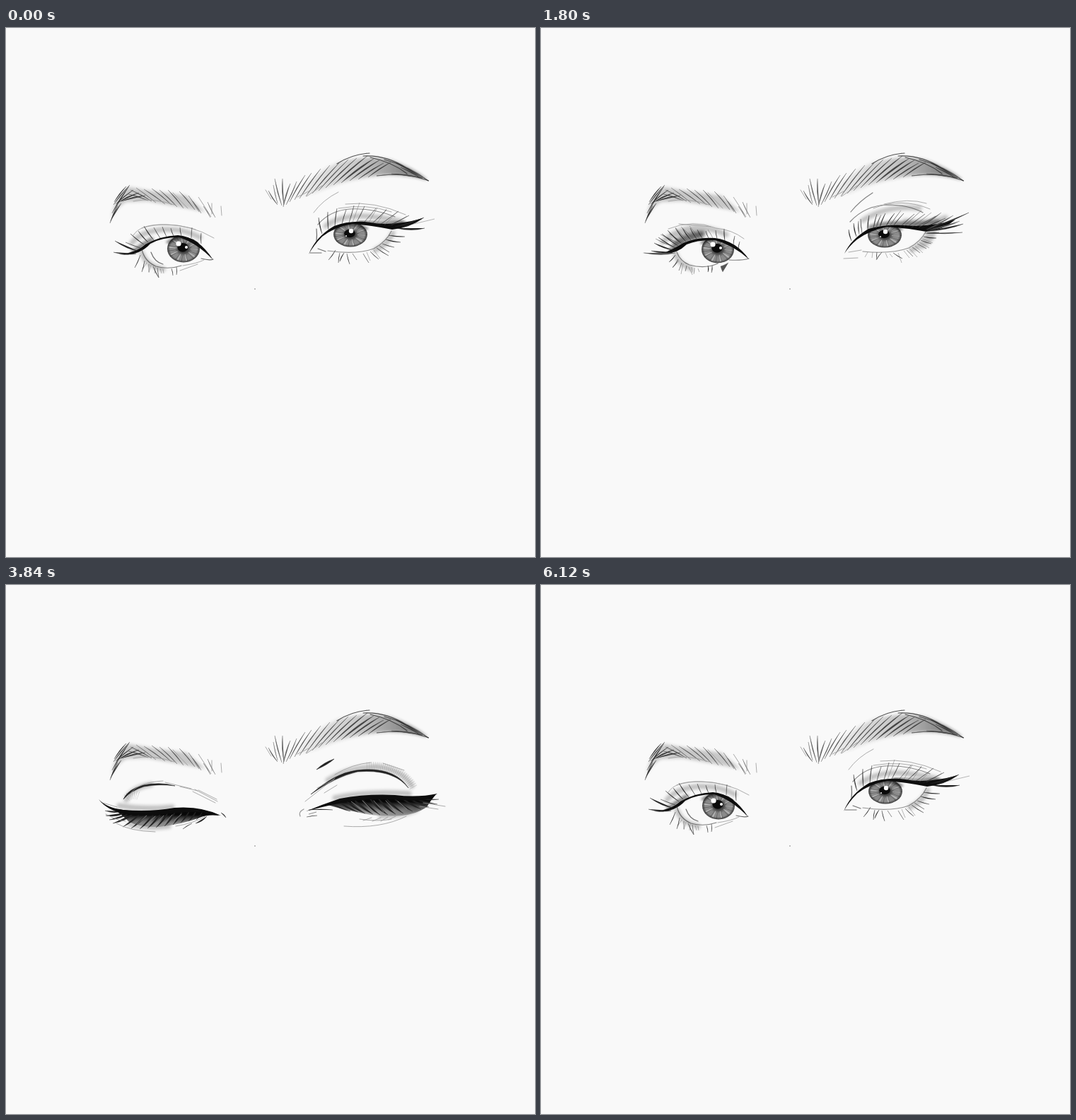
Write an HTML page without scripts that moves like this. It is 748 by 748 pixels and loops after 6.24 s.

```html
<!DOCTYPE html>
<html lang="en">
<head>
<meta charset="utf-8">
<title>Blinking eyes</title>
<style>
html,body{margin:0;width:100%;height:100%;overflow:hidden;background:#f9f9f9}
svg{display:block;width:100%;height:100%}
.h{fill:#222;stroke:#222;stroke-width:.5;stroke-linejoin:round;filter:url(#fine)}
.t{fill:#555;stroke:#555;stroke-width:.4}
.k{fill:#0d0d0d;filter:url(#fine)}
.l,.g,.s,.d,.x{fill:none;stroke:#333;stroke-width:1.2;stroke-linecap:round}
.g{stroke:#999;stroke-width:.8}
.s,.d{stroke:#555;stroke-width:7;opacity:.35;filter:url(#soft)}
.d{stroke:#111;stroke-width:5;opacity:.6}
.x{stroke:#777;stroke-width:12;stroke-linecap:butt;stroke-dasharray:.5 2.3;opacity:.4}
.m{filter:url(#soft)}
.p{opacity:0;animation:1.56s step-end infinite}
#pa{animation-name:a}#pb{animation-name:b}#pc{animation-name:c}
#pd{animation-name:d}#pe{animation-name:e}#pf{animation-name:f}
@keyframes a{0%{opacity:1}15.38%{opacity:0}92.3%,to{opacity:1}}
@keyframes b{0%{opacity:0}15.38%{opacity:1}23.07%{opacity:0}84.61%{opacity:1}92.3%,to{opacity:0}}
@keyframes c{0%{opacity:0}23.07%{opacity:1}30.76%{opacity:0}76.92%{opacity:1}84.61%,to{opacity:0}}
@keyframes d{0%{opacity:0}30.76%{opacity:1}38.46%{opacity:0}69.23%{opacity:1}76.92%,to{opacity:0}}
@keyframes e{0%{opacity:0}38.46%{opacity:1}46.15%{opacity:0}61.53%{opacity:1}69.23%,to{opacity:0}}
@keyframes f{0%{opacity:0}46.15%{opacity:1}61.53%,to{opacity:0}}
</style>
</head>
<body>
<svg viewBox="0 0 748 748">
<defs>
<filter id="soft" x="-30%" y="-60%" width="160%" height="220%"><feGaussianBlur stdDeviation="2"/></filter>
<filter id="fine"><feGaussianBlur stdDeviation=".4"/></filter>
<radialGradient id="ir">
<stop offset=".3" stop-color="#444"/><stop offset=".55" stop-color="#888"/>
<stop offset=".82" stop-color="#8c8c8c"/><stop offset="1" stop-color="#3a3a3a"/>
</radialGradient>
<linearGradient id="bg">
<stop offset="0" stop-color="#555" stop-opacity=".05"/><stop offset=".5" stop-color="#444" stop-opacity=".28"/>
<stop offset="1" stop-color="#222" stop-opacity=".7"/>
</linearGradient>
<linearGradient id="lash" x2="0" y2="1">
<stop offset=".35" stop-color="#080808"/><stop offset="1" stop-color="#333" stop-opacity=".3"/>
</linearGradient>
<g id="iris">
<circle r="23" fill="url(#ir)"/>
<circle r="15" fill="none" stroke="#e4e4e4" stroke-width="11" stroke-dasharray="1.6 8" opacity=".5"/>
<circle r="17" fill="none" stroke="#222" stroke-width="11" stroke-dasharray=".8 6.3" opacity=".4"/>
<path class="d" d="M-21-11Q0-27 21-11"/>
<circle cx="-1" cy="-2" r="7.5" fill="#0b0b0b"/>
</g>
<g id="irisL"><g transform="scale(1 .85)"><use href="#iris"/></g><circle cx="-7" cy="-7" r="3.6" fill="#fff"/><circle cx="4" cy="-2" r="2" fill="#fff"/></g>
<g id="irisR"><g transform="scale(1.04 .76)"><use href="#iris"/></g><circle cx="1" cy="-5" r="3.2" fill="#fff"/><circle cx="-6" cy="2" r="1.1" fill="#ddd"/></g>

<clipPath id="al"><path d="M192 314Q200 301 222 297Q245 291 265 299Q282 308 293 327Q268 330 250 336Q225 342 206 334Q195 326 192 314z"/></clipPath>
<clipPath id="ar"><path d="M430 318Q440 295 465 281Q490 272 515 277Q535 282 544 286Q538 302 520 313Q492 320 430 318z"/></clipPath>
<clipPath id="bl"><path d="M192 318Q200 304 222 300Q245 296 265 303Q282 311 293 327Q270 328 250 333Q225 341 206 334Q195 328 192 318z"/></clipPath>
<clipPath id="br"><path d="M430 318Q441 299 463 286Q490 278 515 281Q535 283 542 288Q536 302 520 311Q492 318 430 318z"/></clipPath>
<clipPath id="cl"><path d="M190 321Q205 308 225 305Q248 302 268 309Q284 316 295 327Q268 330 250 334Q225 340 206 335Q194 330 190 321z"/></clipPath>
<clipPath id="cr"><path d="M430 318Q445 304 467 292Q490 285 515 287Q535 288 545 292Q537 304 520 311Q490 319 430 318z"/></clipPath>
<clipPath id="dl"><path d="M186 323Q208 313 230 311Q255 309 275 316Q288 321 297 327Q265 332 240 337Q205 340 186 323z"/></clipPath>
<clipPath id="dr"><path d="M428 318Q447 309 468 299Q490 292 520 293Q540 294 550 297Q538 308 520 313Q490 319 428 318z"/></clipPath>
<clipPath id="el"><path d="M178 324Q210 320 235 316Q268 315 300 326Q265 331 240 335Q200 337 178 324z"/></clipPath>
<clipPath id="er"><path d="M426 319Q450 312 470 303Q495 296 525 297Q545 298 558 300Q540 312 520 315Q490 319 426 319z"/></clipPath>

<!-- raised lashes -->
<g id="upL">
<path class="d" d="M184 313Q200 300 228 294M188 305Q203 292 228 290"/>
<path class="h" d="M186 317q-16 3-30-2M187 314q-15-2-27-10M190 311q-12-5-24-15M194 308q-13-7-23-17M199 305q-12-8-20-19M205 302q-9-8-15-19M212 300q-8-8-12-17M220 298q-6-7-9-15M228 297q-5-6-7-12M237 297q-3-5-4-10M249 298q-2-6-2-12M260 301q-2-8-1-17M272 307q0-7 2-13M279 313q0-6 2-11"/>
<path class="t" d="M190 318q-20 5-44 0M188 310q-16-6-26-12M196 306q-14-9-27-14M201 304q-12-9-20-13M208 302q-9-9-18-20M216 299q-8-9-18-18M224 298q-6-8-14-18M243 297q-3-6-7-12"/>
</g>
<g id="upR">
<path class="d" d="M500 276Q525 280 562 274M465 282Q488 274 520 277"/>
<path class="h" d="M439 301q-4-8-4-16M446 295q-4-8-4-19M454 290q-2-9-2-20M462 286q-1-10 2-21M470 284q1-10 5-21M479 282q2-10 8-20M488 280q4-9 12-18M498 280q6-9 15-18M508 281q9-9 20-18M518 281q12-8 25-18M529 282q15-8 29-16M538 283q18-6 34-14M546 285q26-7 59-24M548 287q26-1 49-10M546 290q26 2 50-1"/>
<path class="t" d="M450 292q-3-9-1-19M474 283q1-9 7-19M493 280q6-10 16-22M513 281q10-10 25-23M524 282q14-10 28-21M534 282q16-7 32-21M545 285q20-7 38-20M550 285q25-3 42-12"/>
</g>
<!-- lower lashes -->
<g id="loL">
<path class="s" d="M190 319Q194 333 212 340"/>
<path class="h" d="M190 321q-4 7-9 10M194 327q-3 7-8 12M199 332q-2 6-4 11M206 336q-1 5-2 8M236 336q2 5 0 9M242 336q1 5-1 10"/>
<path class="t" d="M195 329q-5 6-9 9M201 333q-2 9-3 15M209 338q3 6 5 11M217 339q0 6-1 9M213 338q1 5 1 8M222 340q1 3 2 5M265 332q-7 4-11 5q1 4 3 8"/>
</g>
<g id="loR">
<path class="s" d="M549 288Q542 305 524 314M556 286Q552 302 538 309"/>
<path class="h" d="M475 317q-1 5 0 10M482 317q-5 5-8 11M498 318q6 5 13 8M517 314q5 5 9 9M525 310q6 4 11 8M532 305q7 4 13 7M537 300q8 4 15 5M541 295q9 3 18 2M543 290q11 1 20-1"/>
<path class="t" d="M462 317l-4 7M469 317l-1 8M487 318l3 7M493 319l4 5M505 318l5 14M513 315l8 10M521 312l11 12M529 308l11 10M535 303l14 8M539 298l15 6"/>
</g>
<!-- lowered lashes -->
<g id="downL">
<path fill="url(#lash)" d="M150 316Q200 324 240 317Q275 313 302 326Q284 324 274 329Q250 338 217 342Q190 343 174 335Q164 324 150 316z"/>
<path class="h" d="M162 320q-8 4-22-1M168 322q-10 7-27 4M174 323q-11 8-28 9M181 323q-11 11-30 14M190 323q-9 12-25 19M200 323q-8 13-23 21M210 322q-7 14-21 23M220 321q-6 14-20 23M230 320q-5 14-18 23M240 319q-4 13-16 22M250 318q-3 12-14 21M260 318q-3 11-13 18M269 319q-2 9-11 15M278 320q-2 7-9 12"/>
<path class="g" d="M185 338l14-12M197 340l14-13M210 340l13-14M224 337l11-12M238 333l10-9"/>
</g>
<g id="downR">
<path fill="url(#lash)" d="M455 311Q480 302 515 299Q555 297 586 302L608 296Q600 305 595 314Q580 324 560 326Q525 328 500 322Q475 317 455 311z"/>
<path class="h" d="M460 309q10 7 27 11M470 306q9 10 28 15M480 304q8 12 28 19M491 302q7 13 28 22M502 301q8 14 27 24M513 300q7 15 27 25M525 300q7 15 26 24M536 300q7 13 26 23M547 300q9 12 28 20M558 300q10 11 29 17M568 301q11 8 30 13M577 302q12 6 33 8M586 302q11 3 26 1"/>
<path class="g" d="M488 306l17 13M504 305l15 15M520 305l14 16M537 305l13 14M554 306l13 11M590 308l31 5M585 313l26 4"/>
</g>
<!-- creases of the closed lids -->
<g id="fold">
<path class="s" d="M170 304Q176 287 205 282"/>
<path class="x" d="M171 301Q178 294 189 299"/>
<path class="h" d="M166 303Q172 289 194 283Q218 278 239 284Q216 281 195 285Q176 291 166 303z"/>
<path class="g" d="M176 295q10-16 46-18M225 279l37 9M246 285l25 6M267 289l32 17M272 290l26 13M264 292l32 16"/>
<path class="s" d="M455 276Q485 257 525 257Q560 261 574 284"/>
<path class="x" d="M510 256Q558 255 576 286"/>
<path class="h" d="M431 296Q465 266 495 262Q548 255 569 287Q548 260 497 264Q466 271 431 296z"/>
<path class="g" d="M423 306l42-33M440 287l24-12M450 294l18-11M465 268q25-15 51-17M533 252l30 10"/>
</g>
</defs>

<rect width="748" height="748" fill="#f9f9f9"/>

<!-- brows -->
<path class="m" fill="#555" opacity=".3" d="M149 268Q155 236 175 225L210 231L255 237L282 260L240 252L200 245L170 246Q158 252 149 268z"/>
<path class="h" opacity=".9" d="M147 276q4-14 11-25M148 273q6-15 15-25M150 262q10-21 24-38M152 250q9-14 23-28M155 249q12-12 25-20M158 247q14-10 30-14M163 245q16-7 34-8M153 246q7-13 17-22"/>
<path class="h" opacity=".7" d="M173 235q14 2 28 9M176 229q16 6 30 16M184 226q15 10 28 21M195 228q16 9 30 21M206 227q15 10 28 23M217 229q14 11 25 24M229 229q13 12 22 26M245 231q12 11 22 26M258 237q8 10 15 23M264 245q7 8 12 17M272 239q8 12 18 28M279 252q6 7 10 16M285 246q4 11 11 22"/>
<path class="g" d="M304 252l1 13M180 245q25-6 58 5M291 248l0 15M236 233l21 22"/>
<path class="m" fill="url(#bg)" d="M405 241Q430 208 470 190Q510 178 545 187Q575 198 596 215Q560 205 525 209Q475 215 440 232z"/>
<path class="h" opacity=".75" d="M371 230q5 12 13 20M380 213q3 20 10 38M378 222q2 14 6 26M391 213q-2 18 2 37M402 220q-7 14-10 33M396 250q9-15 15-33M401 246q9-20 22-38M408 243q10-20 24-38M415 241q13-22 30-42M424 238q15-23 34-44M433 234q17-23 38-43M442 230q19-23 42-44M452 226q20-23 44-42"/>
<path class="h" opacity=".8" d="M463 222q23-24 48-41M474 219q21-21 46-34M486 216q20-18 42-29M498 214q17-14 36-23M512 211q15-13 32-21"/>
<path class="l" opacity=".85" d="M468 192q22-14 46-15M505 181q32-2 62 17M515 183q30 6 52 23M535 186q34 9 62 30"/>
<path class="h" opacity=".85" d="M524 209q36-6 74 7q-32-13-74-7zM545 206q22 0 44 6M551 191q20 8 38 21M558 197q16 6 28 15"/>
<path class="g" d="M367 229l8 13M412 239l18-9M425 238l22-15"/>
<circle cx="352" cy="369" r=".8" fill="#777"/>

<!-- wide open -->
<g class="p" id="pa">
<path class="s" d="M178 304Q192 287 222 285Q250 283 274 296M192 318Q198 336 222 341"/>
<path class="d" d="M180 316Q194 306 206 299"/>
<g clip-path="url(#al)"><use href="#irisL" x="251" y="312"/></g>
<path class="k" d="M160 320Q184 318 197 306Q218 294 243 293Q272 295 293 328Q270 304 245 296Q220 296 204 305Q188 323 160 320z"/>
<path class="l" d="M192 313Q196 330 212 337Q230 342 248 336" opacity=".6"/>
<path class="l" d="M276 326Q288 329 293 327M205 317Q210 331 222 334" opacity=".7"/>
<path class="g" d="M180 293Q190 277 225 278Q262 278 294 297M192 283Q225 272 268 285M246 343l25-9M250 336q20-3 30-8"/>
<path class="h" d="M184 319q-16 3-32-2M186 315q-15-2-32-14M190 311q-10-3-21-8M195 306q-9-5-19-15M201 303q-8-6-14-16M209 300q-8-8-14-20M218 297q-5-7-9-15M227 295q-4-7-6-14M237 294q-3-5-4-11M248 294q-2-6-2-12M262 297q0-8 1-15M276 305q-1-8 0-15"/>
<path class="h" d="M190 321q-3 10-8 18M196 329q-1 9-4 16M202 334q0 6 0 11M208 337q3 9 8 16M214 339q1 9 2 14M234 340q2 5 2 10M241 338q1 6 0 11"/>
<path class="t" d="M199 332l-6 9M205 335l-3 11M211 338l-1 9M222 341l1 6M218 340l2 7"/>

<path class="s" d="M452 280Q475 264 510 266Q535 268 560 274M547 290Q540 306 522 314"/>
<path class="d" d="M500 274Q525 279 562 276"/>
<g clip-path="url(#ar)"><use href="#irisR" x="487" y="292"/></g>
<path class="k" d="M428 320Q438 295 464 280Q488 271 515 275Q545 281 590 269Q570 283 546 285Q516 279 490 277Q465 281 447 295Q435 307 428 320z"/>
<path class="l" d="M455 315Q495 321 520 312Q538 302 545 287" opacity=".5"/>
<path class="l" d="M430 318l16 0M441 312l11 4M439 284q1 8 0 18" opacity=".7"/>
<path class="l" d="M441 278Q458 258 486 256Q518 254 550 267" opacity=".55"/>
<path class="g" d="M435 261Q448 243 470 232M480 249Q520 244 565 264M470 255Q510 248 545 260"/>
<path class="h" d="M447 291q-4-9-5-23M456 285q-2-10-1-25M465 280q0-11 3-25M475 277q2-10 6-20M485 275q4-11 7-24M496 274q6-10 11-22M507 274q8-9 16-19M518 276q10-8 20-19M529 278q13-9 26-19M540 280q14-6 30-15M550 281q22-3 41-13M552 283q22 5 40 0"/>
<path class="t" d="M560 281l46-11M545 279l22-13M535 279l18-19M524 277l14-21M513 275l12-21M490 275l10-28"/>
<path class="h" d="M466 314q-4 8-10 14M472 318q-2 6-2 14M478 318q-5 6-6 12M482 319q1 8 4 15M490 319q4 6 6 9M505 319q4 7 8 13M515 316q5 6 12 11M524 311q7 6 17 11M532 305q9 4 17 5M537 299q9 4 21 4M541 293q11 3 23 2M528 308q7 5 14 9"/>
<path class="t" d="M520 314l9 12M510 317l5 12"/>
</g>

<!-- relaxed -->
<g class="p" id="pb">
<path class="s" d="M172 303Q190 285 218 282Q240 282 262 292M182 297Q200 287 232 289"/>
<g clip-path="url(#bl)"><use href="#irisL" x="250" y="313"/></g>
<path class="k" d="M172 319Q190 311 201 304Q222 295 246 297Q276 301 294 327Q272 307 246 300Q222 299 206 306Q192 320 172 319z"/>
<path class="l" d="M192 317Q197 330 210 335Q232 341 250 333M266 328Q284 329 294 326" opacity=".6"/>
<path class="g" d="M180 284Q215 270 247 283Q270 285 287 298M195 277l45 4M145 318l26 2"/>
<use href="#upL"/><use href="#loL"/>
<path class="s" d="M455 272Q490 250 535 255M515 273Q550 277 572 268"/>
<g clip-path="url(#br)"><use href="#irisR" x="486" y="293"/></g>
<path class="k" d="M429 319Q438 299 463 284Q490 277 515 279Q550 282 586 271Q568 286 545 288Q518 283 490 281Q465 286 447 299Q436 308 429 319z"/>
<path class="l" d="M455 316Q495 320 520 311Q537 302 544 288" opacity=".5"/>
<path class="l" d="M437 274Q458 251 490 250Q520 250 540 261" opacity=".6"/>
<path class="l" d="M438 260Q450 245 469 233" opacity=".6"/>
<path class="g" d="M428 326l20-1M435 317l18-3M470 255Q510 239 550 256M485 249Q520 240 545 248"/>
<use href="#upR"/><use href="#loR"/>
</g>

<!-- lids dropping -->
<g class="p" id="pc">
<path class="s" d="M172 305Q190 284 218 282Q240 282 265 291"/>
<g clip-path="url(#cl)"><use href="#irisL" x="250" y="315"/></g>
<path class="k" d="M160 320Q185 317 203 307Q225 299 248 301Q278 306 296 327Q275 311 248 305Q225 304 207 311Q190 326 160 320z"/>
<path class="l" d="M190 320Q197 333 212 336Q232 340 250 334M266 329Q284 329 295 327" opacity=".6"/>
<path class="l" d="M173 296Q188 280 220 280Q250 281 282 298" opacity=".5"/>
<use href="#upL" transform="translate(0 101)scale(1 .68)"/><use href="#loL"/>
<path class="s" d="M458 271Q490 254 535 258"/>
<g clip-path="url(#cr)"><use href="#irisR" x="486" y="295"/></g>
<path class="k" d="M429 319Q442 303 467 290Q490 282 515 283Q555 287 598 277Q575 293 548 295Q518 288 490 287Q465 293 447 304Q436 311 429 319z"/>
<path class="l" d="M455 316Q495 320 520 312Q537 304 546 293" opacity=".5"/>
<path class="l" d="M435 282Q460 256 492 254Q525 253 555 269M438 260L465 238" opacity=".6"/>
<path class="g" d="M428 325l18-1M470 257Q510 245 555 260"/>
<use href="#upR" transform="translate(0 97)scale(1 .68)"/><use href="#loR"/>
</g>

<!-- half closed -->
<g class="p" id="pd">
<use href="#fold"/>
<g clip-path="url(#dl)"><use href="#irisL" x="250" y="318"/></g>
<path class="k" d="M146 313Q182 321 206 313Q228 306 252 307Q282 311 298 327Q278 316 252 311Q230 310 209 317Q185 330 146 313z"/>
<path class="l" d="M188 325Q197 335 212 337Q232 340 255 333" opacity=".6"/>
<use href="#upL" transform="translate(-3 230)scale(1 .27)"/><use href="#loL"/>
<g clip-path="url(#dr)"><use href="#irisR" x="486" y="298"/></g>
<path class="k" d="M427 319Q446 307 468 296Q492 288 520 289Q560 294 604 286Q580 300 552 301Q520 294 492 293Q467 299 447 308Q436 313 427 319z"/>
<path class="l" d="M455 317Q495 320 522 313Q540 306 551 298M438 260L464 243" opacity=".6"/>
<use href="#upR" transform="translate(4 214)scale(1 .28)"/><use href="#loR"/>
</g>

<!-- nearly closed -->
<g class="p" id="pe">
<use href="#fold"/>
<g clip-path="url(#el)"><use href="#irisL" x="250" y="322"/></g>
<path class="k" d="M136 307Q175 323 208 318Q235 311 258 313Q285 316 301 326Q278 319 256 317Q232 317 207 322Q170 328 136 307z"/>
<use href="#downL" transform="translate(0 128)scale(1 .59)"/>
<path class="l" d="M180 329Q200 340 245 336L268 330" opacity=".55"/>
<g clip-path="url(#er)"><use href="#irisR" x="486" y="302"/></g>
<path class="k" d="M425 319Q449 311 470 300Q498 293 526 293Q562 298 607 291Q582 304 556 304Q525 298 496 298Q470 303 448 312z"/>
<use href="#downR" transform="translate(0 117)scale(1 .6)"/>
<path class="l" d="M470 321Q515 326 556 311" opacity=".5"/>
<path class="l" d="M438 260L464 245" stroke-width="2"/>
</g>

<!-- closed -->
<g class="p" id="pf">
<use href="#fold"/>
<path class="s" d="M160 312Q195 318 235 314M175 338Q200 345 230 341"/>
<use href="#downL"/>
<path class="k" d="M131 303Q142 315 166 318Q205 321 238 315Q275 312 304 326Q275 319 242 322Q200 328 168 324Q142 318 131 303z"/>
<path class="h" d="M263 337q-7 3-13 8M284 327q-6 8-16 10M304 322q5 2 7 7"/>
<path class="g" d="M137 308l20 6M141 324q16 9 28 10M156 337Q175 348 211 349M240 341q25-4 42-14"/>
<path class="s" d="M465 301Q510 291 570 295M530 327Q560 326 580 318"/>
<use href="#downR"/>
<path class="k" d="M424 320Q448 310 472 302Q510 295 550 297Q582 301 610 295Q595 306 575 305Q540 302 510 303Q475 306 424 320z"/>
<path class="h" d="M439 261Q449 251 464 246Q455 254 439 261zM428 318q16-2 34 0M425 328q8-2 15-2M428 324l11-3"/>
<path class="l" d="M416 327Q413 321 421 317" opacity=".5"/>
<path class="g" d="M478 341Q530 345 566 327M500 331q25 4 45 0M505 333l12-4M518 334l12-5M530 334l10-6M541 332l10-5"/>
</g>
</svg>
</body>
</html>
```
